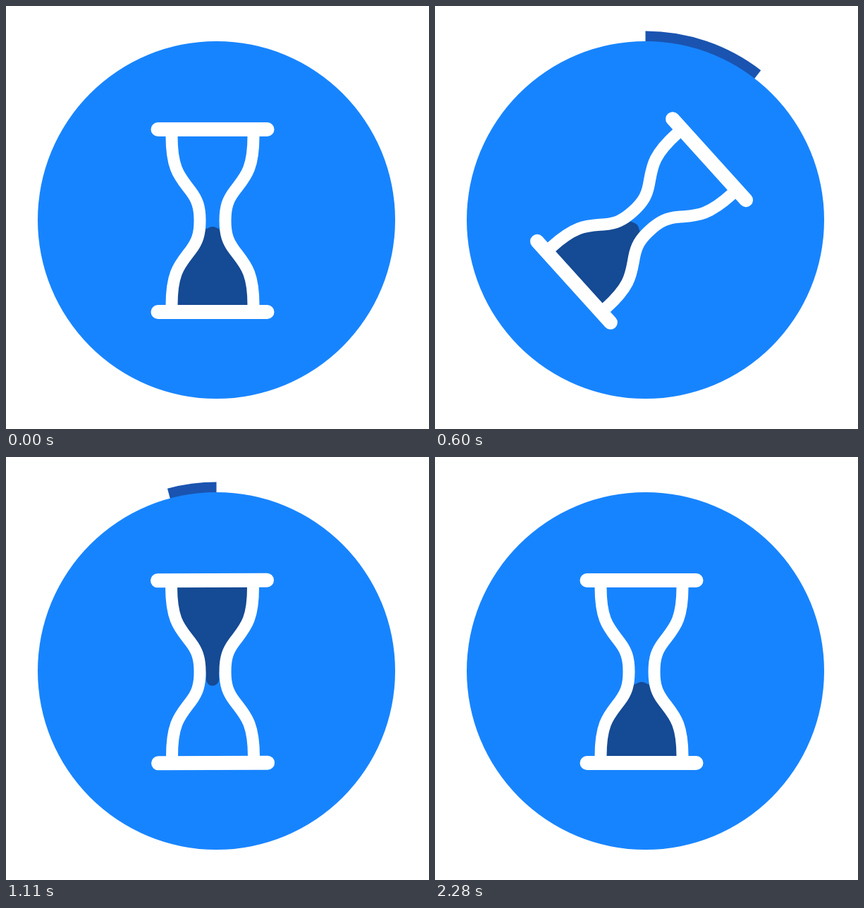
Animation of 600 by 600 pixels, one loop 2.31 s. Source, as an HTML page with a canvas:

```html
<!DOCTYPE html>
<html lang="en">
<head>
<meta charset="utf-8">
<title>Hourglass</title>
<style>
  html, body { margin: 0; width: 100%; height: 100%; overflow: hidden; background: #fff; }
  canvas { display: block; }
</style>
</head>
<body>
<canvas id="stage" width="600" height="600"></canvas>
<script>
const ctx = document.getElementById('stage').getContext('2d');
const LOOP = 2310, STEP = 30, FLIP = 1080;
const BLUE = '#1784ff', RING = '#1a54b0', SAND = '#154a94';
const CX = 293, CY = 304.5;

const clamp = x => Math.min(1, Math.max(0, x));
const mix = (a, b, k) => a + (b - a) * k;

// Progress along cubic-bezier(a, 0, b, 1)
function ease(x, a, b) {
  x = clamp(x);
  let lo = 0, hi = 1;
  for (let i = 0; i < 24; i++) {
    const u = (lo + hi) / 2, v = 1 - u;
    if (3 * a * u * v * v + 3 * b * u * u * v + u * u * u < x) lo = u; else hi = u;
  }
  return lo * lo * (3 - 2 * lo);
}

// Linear interpolation through [time, value] pairs
function track(t, keys) {
  for (let i = 1; i < keys.length; i++) {
    const [t0, v0] = keys[i - 1], [t1, v1] = keys[i];
    if (t <= t1) return mix(v0, v1, clamp((t - t0) / (t1 - t0)));
  }
  return keys[keys.length - 1][1];
}

function line(x1, y1, x2, y2, width, color) {
  ctx.beginPath();
  ctx.moveTo(x1, y1);
  ctx.lineTo(x2, y2);
  ctx.lineWidth = width;
  ctx.strokeStyle = color;
  ctx.lineCap = 'round';
  ctx.stroke();
}

// One glass wall: sx picks the side, sy = -1 runs from top to bottom
function wall(sx, sy, start) {
  const p = (x, y) => `${x * sx} ${y * sy} `;
  return start + p(58, 120) +
    'C' + p(58, 72) + p(46, 62) + p(31, 42) +
    'C' + p(22, 30) + p(18, 20) + p(18, 0) +
    'C' + p(18, -20) + p(22, -30) + p(31, -42) +
    'C' + p(46, -62) + p(58, -72) + p(58, -120);
}
const walls = new Path2D(wall(-1, -1, 'M') + wall(1, -1, 'M'));
const inside = new Path2D(wall(-1, -1, 'M') + wall(1, 1, 'L') + 'Z');

function drawRing(t) {
  const head = ease((t - 448) / 568, .57, .42);
  const tail = ease((t - 688) / 542, .62, .28);
  if (head <= tail) return;
  const angle = p => p * 2 * Math.PI - Math.PI / 2;
  ctx.beginPath();
  ctx.arc(298.5, 304, 259, angle(tail), angle(head));
  ctx.lineWidth = 19;
  ctx.lineCap = 'butt';
  ctx.strokeStyle = RING;
  ctx.stroke();
}

// Sand heap with its middle at y; dome 0 is wavy, 1 is a smooth mound
function drawHeap(y, dome) {
  const at = (wave, mound) => y + mix(wave, mound, dome);
  ctx.beginPath();
  ctx.moveTo(-58, 122);
  ctx.lineTo(-58, at(-1, 35));
  ctx.bezierCurveTo(-31, at(-24, 18), mix(-33, -8, dome), at(2, 0), 0, y);
  ctx.bezierCurveTo(mix(15, 8, dome), at(2, 0), 31, at(-14, 18), 58, at(16, 35));
  ctx.lineTo(58, 122);
  ctx.fill();
}

function drawUpperSand(y, tilt) {
  ctx.beginPath();
  ctx.moveTo(-58, 1);
  ctx.lineTo(-58, y + 2 * tilt);
  ctx.bezierCurveTo(-38, y - 18 * tilt, 5, y - 8 * tilt, 52, y + 13 * tilt);
  ctx.lineTo(58, y + 13 * tilt);
  ctx.lineTo(58, 1);
  ctx.fill();
}

function drawSand(t) {
  ctx.save();
  ctx.clip(inside);
  ctx.fillStyle = SAND;
  if (t < FLIP) {
    drawHeap(8.5, 1);
  } else {
    const level = track(t, [[1200, -122], [1290, -119], [1530, -98], [1620, -83], [2130, 0]]);
    const heap = track(t, [[1290, 126], [1530, 95], [2160, 36], [2280, 14.5], [2310, 8.5]]);
    const tip = track(t, [[1080, -12], [1110, 11], [1290, 120]]);
    const end = track(t, [[2130, -8], [2160, 9], [2220, 40]]);
    if (level < 0) drawUpperSand(level, Math.sin(Math.PI * clamp((t - 1200) / 900)));
    if (t >= 1290) drawHeap(heap, clamp((t - 1530) / 600));
    const bottom = Math.min(tip, heap);
    if (end < bottom) line(0, end, 0, bottom, t < 1200 ? 18 : 15, SAND);
  }
  ctx.restore();
}

function draw(t) {
  ctx.fillStyle = '#fff';
  ctx.fillRect(0, 0, 600, 600);
  drawRing(t);
  ctx.beginPath();
  ctx.arc(298.5, 303.5, 253.5, 0, 2 * Math.PI);
  ctx.fillStyle = BLUE;
  ctx.fill();

  ctx.save();
  ctx.translate(CX, CY);
  // The glass is symmetric, so after the flip only the sand changes ends
  ctx.rotate(Math.PI * (ease(t / 1150, .868, .428) - (t >= FLIP ? 1 : 0)));
  drawSand(t);
  ctx.lineWidth = 17;
  ctx.lineCap = 'butt';
  ctx.strokeStyle = '#fff';
  ctx.stroke(walls);
  for (const y of [-129.5, 129.5]) line(-77.5, y, 77.5, y, 20, '#fff');
  ctx.restore();
}

const start = performance.now();
function tick() {
  const t = (performance.now() - start) % LOOP;
  draw(Math.floor(t / STEP) * STEP);
  requestAnimationFrame(tick);
}
tick();
</script>
</body>
</html>
```
